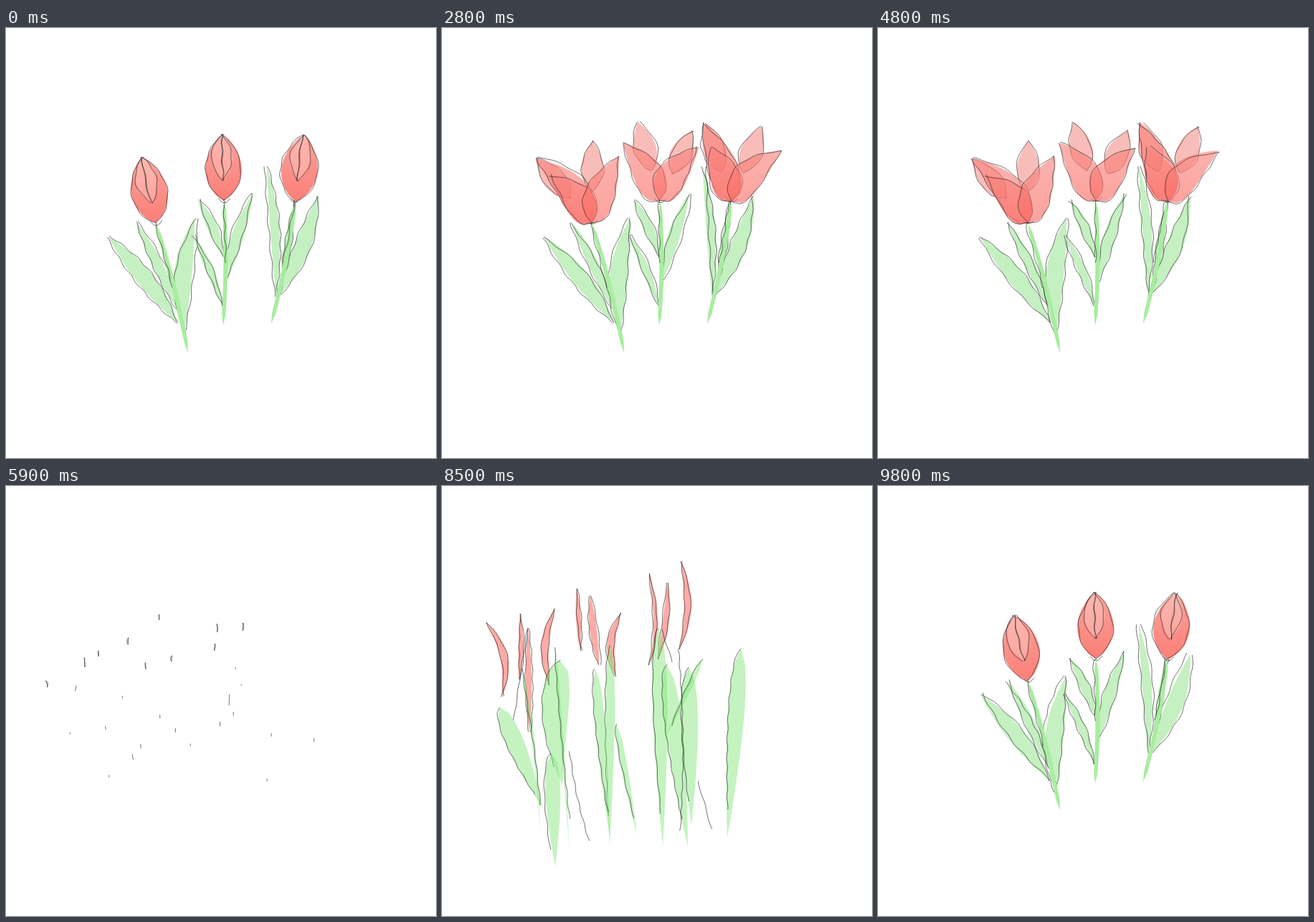
Animation of 600 by 600 pixels, one loop 9900 ms. Source, as an HTML page:

```html
<!DOCTYPE html>
<html lang="en">
<head>
<meta charset="utf-8">
<title>Tulips</title>
<style>
html, body { margin: 0; width: 100%; height: 100%; overflow: hidden; background: #fff; }
svg { display: block; width: 100vw; height: 100vh; }
</style>
</head>
<body>
<svg id="stage" viewBox="0 0 600 600">
  <defs>
    <linearGradient id="bud" x1="0" y1="0" x2="0" y2="1">
      <stop offset="0" stop-color="#f9a39d"/>
      <stop offset="1" stop-color="#fc7f77"/>
    </linearGradient>
    <linearGradient id="petal" x1="0" y1="0" x2="0" y2="1">
      <stop offset="0" stop-color="#f9837d" stop-opacity=".62"/>
      <stop offset="1" stop-color="#fb6a62" stop-opacity=".62"/>
    </linearGradient>
  </defs>
</svg>
<script>
const LOOP = 9900, STEP = 100;
const OPEN_AT = 2100, SCATTER_AT = 5100, CLOSE_AT = 9100;

// skew < 1 moves the widest part towards the start, round < 1 blunts the ends;
// ink lists the inked edges, reach is the inked share of their length
const STYLES = {
  leaf: { fill: '#c5f0c1', skew: 1, round: .9, ink: [-1, 1] },
  stem: { fill: '#a8eda0', skew: 1, round: .12, ink: [1], reach: .5 },
  bud: { fill: 'url(#bud)', skew: .92, round: .75, ink: [-1, 1] },
  streak: { fill: 'rgba(255,228,222,.3)', skew: 1, round: .8, ink: [-1, 1] },
  back: { fill: '#f9bdb9', skew: .85, round: .9, ink: [-1, 1] },
  petal: { fill: 'url(#petal)', skew: .65, round: .85, ink: [-1, 1] },
  sliver: { fill: 'rgba(250,110,103,.58)', skew: 1, round: .8, ink: [-1, 1], seed: .09 },
  blade: { fill: 'rgba(122,228,112,.44)', skew: .6, round: .9, ink: [1], reach: .85, seed: .025 },
  stalk: { fill: 'none', skew: 1, round: 1, ink: [1], seed: .06 }
};

// Each row: start x, y, end x, y, width, bend to the side
const leaves = [
  [240, 411, 143, 291, 23, 3], [240, 394, 181, 271, 14, 2], [248, 428, 263, 265, 25, -9],
  [303, 320, 268, 240, 14, 3], [302, 388, 261, 289, 11, 3], [306, 356, 345, 231, 17, -3],
  [377, 375, 364, 193, 13, 5], [384, 366, 403, 240, 10, 0], [382, 372, 436, 235, 23, 5]
];

const flowers = [
  { base: [209, 272], foot: [254, 453], top: [190, 180],
    back: [[131, 182], [210, 157]], front: [[131, 182], [150, 206], [247, 179]] },
  { base: [304, 241], foot: [303, 415], top: [303, 148],
    back: [[273, 131], [349, 143]], front: [[253, 160], [358, 167]] },
  { base: [404, 242], foot: [370, 413], top: [416, 149],
    back: [[368, 133], [446, 137]], front: [[364, 132], [376, 166], [474, 171]] }
];

const slivers = [
  [62, 190, 84, 294, 11, -14], [109, 178, 107, 270, 7, -2], [120, 198, 122, 343, 8, 0],
  [157, 171, 150, 278, 11, 10], [188, 143, 193, 230, 7, 0], [207, 153, 219, 250, 10, 2],
  [250, 177, 243, 266, 11, 11], [289, 122, 291, 250, 6, -8], [315, 135, 302, 242, 9, -4],
  [334, 105, 332, 228, 10, -10]
];
const blades = [
  [81, 309, 141, 450, 25, 0], [164, 243, 168, 418, 38, 8], [153, 373, 158, 531, 21, 0],
  [112, 255, 137, 480, 4, -4], [158, 225, 178, 507, 4, 0], [235, 222, 234, 502, 13, 0],
  [214, 255, 234, 490, 14, 0], [243, 332, 272, 487, 9, 0], [302, 198, 308, 503, 21, 0],
  [313, 249, 343, 503, 24, 0], [344, 253, 348, 473, 24, 0], [363, 241, 312, 350, 8, 0],
  [417, 227, 398, 491, 23, 0]
];
const stalks = [
  [119, 200, 99, 326, 0, 0], [306, 200, 321, 246, 0, 0], [177, 370, 202, 496, 0, 3],
  [329, 228, 331, 481, 0, -5], [357, 412, 375, 479, 0, 0]
];

const NS = 'http://www.w3.org/2000/svg';
const stage = document.getElementById('stage');

function add(parent, tag, attrs) {
  const el = document.createElementNS(NS, tag);
  for (const k in attrs) el.setAttribute(k, attrs[k]);
  return parent.appendChild(el);
}
const clamp = x => Math.max(0, Math.min(1, x));
const ease = x => x * x * (3 - 2 * x);
const mix = (a, b, k) => a.map((v, i) => v + (b[i] - v) * k);
const fmt = p => p[0].toFixed(1) + ' ' + p[1].toFixed(1);

// Seeded value between -1 and 1
function rnd(a, b, c) {
  const v = Math.sin(a * 127.1 + b * 311.7 + c * 74.7) * 43758.5453;
  return (v - Math.floor(v)) * 2 - 1;
}

// Points along one side (-1, 1) of a bent, tapering ribbon
function edge(r, side, steps, reach = 1, wave = () => 0) {
  const { skew, round } = r.style;
  const dx = r.b[0] - r.a[0], dy = r.b[1] - r.a[1], len = Math.hypot(dx, dy) || 1;
  return Array.from({ length: steps + 1 }, (_, i) => {
    const u = i / steps * reach;
    const half = r.width / 2 * Math.abs(Math.sin(Math.PI * u ** skew)) ** round;
    const off = r.bend * Math.sin(Math.PI * u) + side * half + wave(u * len);
    return [r.a[0] + dx * u - dy / len * off, r.a[1] + dy * u + dx / len * off];
  });
}

function outline(r) {
  return edge(r, -1, 12).concat(edge(r, 1, 12).reverse()).map(fmt).join(' ');
}

// A pen line that follows an edge, redrawn by an unsteady hand
function penLine(r, side, n, shake) {
  const seed = r.id * 2 + side;
  const phase = rnd(seed, n, 1) * Math.PI, pace = 5.5 + rnd(seed, n, 2) * 1.5;
  const drift = rnd(seed, n, 3) * 1.6, slope = rnd(seed, n, 4) * .025;
  const wave = d => shake * (drift + slope * d + 1.1 * Math.sin(d / pace + phase));
  const len = Math.hypot(r.b[0] - r.a[0], r.b[1] - r.a[1]);
  const steps = Math.max(3, Math.round(len / 6));
  return 'M' + edge(r, side, steps, r.style.reach, wave).map(fmt).join('L');
}

let count = 0;
function ribbon(group, kind, [x0, y0, x1, y1, width, bend]) {
  const style = STYLES[kind];
  const r = { a: [x0, y0], b: [x1, y1], width, bend, style, id: ++count };
  r.fill = add(group, 'polygon', { fill: style.fill, points: outline(r) });
  r.pens = style.ink.map(side => ({
    side,
    el: add(group, 'path', { fill: 'none', stroke: '#262626', 'stroke-width': .65 })
  }));
  return r;
}

function ink(r, n, shake) {
  for (const p of r.pens) p.el.setAttribute('d', penLine(r, p.side, n, shake));
}

const [plant, closed, open, loose] = Array.from({ length: 4 }, () => add(stage, 'g', {}));

function makeBud({ base, top }) {
  const parts = [ribbon(closed, 'bud', [...base, ...top, 51, 0])];
  for (const bend of [-9, 6]) {
    parts.push(ribbon(closed, 'streak', [...mix(base, top, .3), ...top, 14, bend]));
  }
  return parts;
}

function makeBloom({ base, back, front }) {
  return [
    ...back.map(tip => ribbon(open, 'back', [...mix(base, tip, .38), ...tip, 31, 0])),
    ...front.map(tip => ribbon(open, 'petal', [...base, ...tip, 43, (base[0] - tip[0]) * .12]))
  ];
}

function makeStem({ base: [x, y], foot }) {
  return [
    ribbon(plant, 'stem', [x, y, ...foot, 6, -3]),
    ribbon(plant, 'stalk', [x - 8, y - 4, x + 9, y - 4, 0, 6])
  ];
}

const plantParts = [
  ...leaves.map(row => ribbon(plant, 'leaf', row)),
  ...flowers.flatMap(makeStem)
];
const budParts = flowers.flatMap(makeBud);
const bloomParts = flowers.flatMap(makeBloom);

const pieces = Object.entries({ sliver: slivers, blade: blades, stalk: stalks })
  .flatMap(([kind, rows]) => rows.map(row => ribbon(loose, kind, row)));

// 0 = seeds, 1 = full blades
function growth(t) {
  return t < 6500 ? 1 - ease(clamp((t - 5000) / 900)) : ease(clamp((t - 7000) / 950));
}

// The same ribbon, shrunk around a seed near its middle
function shrink(r, k) {
  const mid = mix(r.a, r.b, .5), s = r.style.seed + (1 - r.style.seed) * k;
  const seed = [mid[0] + rnd(r.id, 0, 1) * 25, mid[1] * .7 + 80 + rnd(r.id, 0, 2) * 30];
  const center = mix(seed, mid, k);
  const place = p => p.map((v, i) => center[i] + (v - mid[i]) * s);
  return { ...r, a: place(r.a), b: place(r.b), width: r.width * s, bend: r.bend * s };
}

function drawLoose(t, n) {
  const k = growth(t);
  for (const piece of pieces) {
    const r = shrink(piece, k);
    r.fill.setAttribute('points', outline(r));
    r.fill.setAttribute('opacity', clamp(k * 5));
    ink(r, n, .3 + k * .4);
  }
}

const show = (g, on) => g.setAttribute('visibility', on ? 'visible' : 'hidden');

function draw(time) {
  const t = time % LOOP, n = t / STEP;
  const isLoose = t >= SCATTER_AT && t < CLOSE_AT;
  const isOpen = t >= OPEN_AT && t < SCATTER_AT;
  show(plant, !isLoose);
  show(open, isOpen);
  show(closed, !isLoose && !isOpen);
  show(loose, isLoose);
  if (isLoose) return drawLoose(t, n);
  for (const r of [...plantParts, ...(isOpen ? bloomParts : budParts)]) ink(r, n, 1);
}

let start, last = -1;
function tick(now) {
  if (start === undefined) start = now;
  const n = Math.floor((now - start) / STEP);
  if (n !== last) draw(n * STEP);
  last = n;
  requestAnimationFrame(tick);
}
draw(0);
requestAnimationFrame(tick);
</script>
</body>
</html>
```
